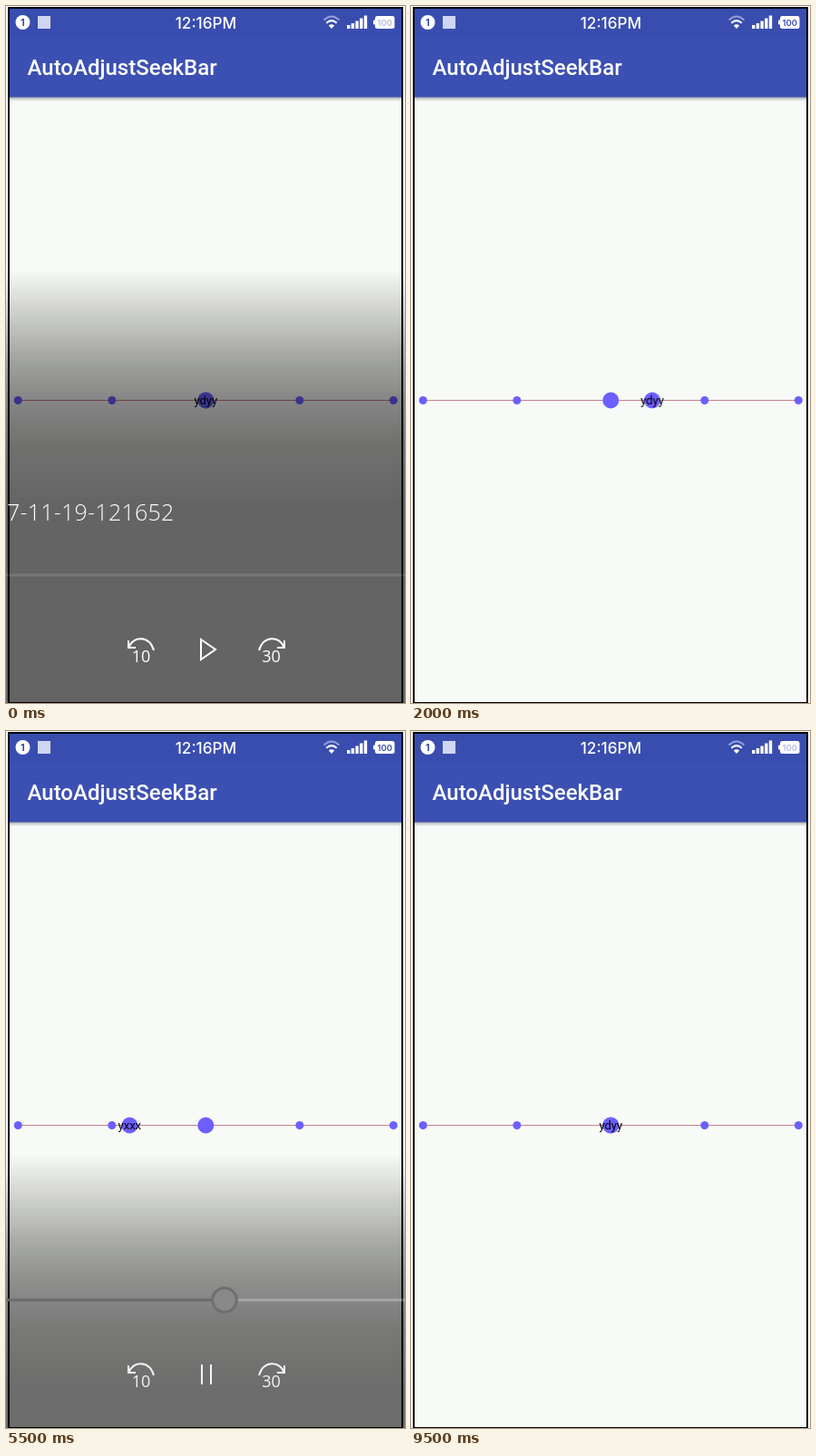
An HTML page for the animation above (9.6 s loop, 440x768 px).

```html
<!DOCTYPE html>
<html lang="en">
<head>
<meta charset="utf-8">
<title>AutoAdjustSeekBar</title>
<style>
html, body { margin: 0; width: 100%; height: 100%; overflow: hidden; background: #fff; }
svg { display: block; width: 440px; height: 768px; }
.clock { font: 500 17.2px Inter, sans-serif; }
.badge { font: 700 11px Inter, sans-serif; }
.title { font: 500 24px Roboto, sans-serif; }
.label { font: 13px Roboto, sans-serif; }
.file { font: 300 25px "Open Sans", sans-serif; letter-spacing: .25px; }
.skip { font: 18px "Open Sans", sans-serif; }
.charge { font: 600 9.5px Inter, sans-serif; }
.mid { text-anchor: middle; }
.line { fill: none; stroke: #fff; stroke-width: 2; }

/* One loop is 9.6 s, so 1% is 96 ms. */
.anim, .label { animation: 9.6s linear infinite; }
.label { animation-timing-function: step-end; }
#thumb { animation-name: drag; }
#mid { animation-name: mid; }
#right { animation-name: right; }
#left { animation-name: left; }
#end { animation-name: end; }
#shade { animation-name: shade; }
#file { animation-name: file; }
#icons { animation-name: icons; }
#seek { animation-name: seek; }
#head { animation-name: head; }
#play { animation-name: play; animation-timing-function: step-end; }
#pause { animation-name: pause; animation-timing-function: step-end; }
#charge { animation-name: charge; }

@keyframes drag {
  0%, 6.25% { transform: translateX(220px); }
  10.42%, 17.71% { transform: translateX(324px); }
  28.13% { transform: translateX(130px); }
  30.21%, 39.58% { transform: translateX(117px); }
  50%, 51.04% { transform: translateX(13px); }
  57.29% { transform: translateX(136px); }
  62.5% { transform: translateX(151px); }
  66.67% { transform: translateX(160px); }
  69.79% { transform: translateX(134px); }
  71.88%, 77.08% { transform: translateX(117px); }
  80.21% { transform: translateX(160px); }
  83.33%, 84.38% { transform: translateX(117px); }
  89.58%, 100% { transform: translateX(220px); }
}
@keyframes mid {
  0%, 20.5%, 86.98%, 100% { opacity: 1; }
  8.33%, 26.05% { opacity: 0; }
}
@keyframes right {
  0%, 20.5%, 100% { opacity: 0; }
  8.33% { opacity: 1; }
}
@keyframes left {
  0%, 44.79%, 86.98%, 100% { opacity: 0; }
  26.05%, 53.69% { opacity: 1; }
}
@keyframes end {
  0%, 53.69%, 100% { opacity: 0; }
  44.79% { opacity: 1; }
}
@keyframes shade {
  0%, 6.25% { opacity: 1; transform: none; }
  11.46% { opacity: .48; transform: translateY(145px); }
  14.58%, 22.92% { opacity: 0; transform: translateY(175px); }
  28.13% { opacity: .91; transform: translateY(175px); }
  31.25%, 58.33% { opacity: .94; transform: translateY(175px); }
  62.5% { opacity: .13; transform: translateY(175px); }
  66.67%, 100% { opacity: 0; transform: translateY(175px); }
}
@keyframes file {
  0%, 6.25% { opacity: 1; }
  11.46% { opacity: .28; }
  14.58%, 100% { opacity: 0; }
}
@keyframes icons {
  0%, 6.25% { opacity: 1; }
  11.46% { opacity: .5; }
  14.58%, 22.92% { opacity: 0; }
  28.13%, 58.33% { opacity: .92; }
  61.46%, 100% { opacity: 0; }
}
@keyframes seek {
  0%, 6.25% { opacity: .45; }
  11.46% { opacity: .6; }
  14.58%, 22.92% { opacity: 0; }
  28.13%, 58.33% { opacity: 1; }
  62.5% { opacity: .15; }
  66.67%, 100% { opacity: 0; }
}
@keyframes head {
  0%, 14.58% { transform: translateX(-60px); }
  22.92%, 28.13% { transform: translateX(13px); }
  57.29%, 100% { transform: translateX(241px); }
}
@keyframes play {
  0%, 100% { opacity: 1; }
  6.25% { opacity: 0; }
}
@keyframes pause {
  0%, 100% { opacity: 0; }
  6.25% { opacity: 1; }
}
@keyframes charge {
  0%, 6.25% { opacity: .38; }
  9.38%, 22.92% { opacity: 1; }
  28.13% { opacity: .65; }
  33.33%, 68.75% { opacity: 1; }
  76.04% { opacity: .55; }
  81.25%, 90.63% { opacity: 1; }
  93.75%, 100% { opacity: .38; }
}
</style>
</head>
<body>
<svg viewBox="0 0 440 768">
  <defs>
    <linearGradient id="dark" gradientUnits="userSpaceOnUse" x1="0" y1="290" x2="0" y2="550">
      <stop offset="0" stop-opacity="0"/>
      <stop offset=".23" stop-opacity=".21"/>
      <stop offset=".4" stop-opacity=".36"/>
      <stop offset=".55" stop-opacity=".46"/>
      <stop offset=".75" stop-opacity=".55"/>
      <stop offset="1" stop-opacity=".6"/>
    </linearGradient>
    <linearGradient id="drop" x1="0" y1="0" x2="0" y2="1">
      <stop offset="0" stop-opacity=".32"/>
      <stop offset="1" stop-opacity="0"/>
    </linearGradient>
    <g id="arc">
      <path class="line" d="M-13.5 -1.5C-9 -14 9 -15 14 2M-14 -9V-1H-6"/>
    </g>
  </defs>

  <!-- Phone screen -->
  <rect x="2" y="1" width="436" height="767"/>
  <rect x="4" y="3" width="432" height="764" fill="#f8faf7"/>
  <rect x="4" y="100" width="432" height="5" fill="url(#drop)"/>
  <rect x="4" y="3" width="432" height="97.5" fill="#3c50b3"/>
  <rect x="4" y="3" width="432" height="31" fill="#394daf"/>

  <!-- Status bar -->
  <g fill="#fff">
    <circle cx="18.5" cy="18" r="8"/>
    <text class="badge mid" x="18.3" y="22" fill="#394daf">1</text>
    <rect x="35" y="11" width="14" height="14" fill="#cfd6f2"/>
    <text class="clock mid" x="220.5" y="24.5">12:16PM</text>
    <g fill="none" stroke="#fff" stroke-width="2">
      <path d="M350.5 15.5Q359 7.5 367.5 15.5" opacity=".45"/>
      <path d="M353.3 18.8Q359 13.5 364.7 18.8"/>
    </g>
    <path d="M355.8 21.5Q359 18.8 362.2 21.5L359 25Z"/>
    <path d="M376 21h3.4v4h-3.4zM380.7 19h3.4v6h-3.4zM385.4 16.5h3.4v8.500h-3.4zM390.100 13.500h3.4v11.500h-3.4zM394.800 10.500h3.4v14.500h-3.4z"/>
    <rect x="405" y="15.5" width="3" height="5" rx="1"/>
    <rect x="407" y="11" width="21.500" height="14" rx="2.500"/>
    <text id="charge" class="charge mid anim" x="417.800" y="21.500" fill="#394daf">100</text>
    <text class="title" x="23.500" y="76">AutoAdjustSeekBar</text>
  </g>

  <!-- Slider -->
  <rect x="13" y="434" width="414" height="1" fill="#cb7f90"/>
  <g fill="#6c5fff">
    <circle cx="13.300" cy="434.500" r="4.500"/>
    <circle cx="116.800" cy="434.500" r="4.500"/>
    <circle cx="220.300" cy="434.500" r="9"/>
    <circle cx="323.800" cy="434.500" r="4.500"/>
    <circle cx="427.300" cy="434.500" r="4.500"/>
  </g>
  <g id="thumb" class="anim">
    <circle cx=".3" cy="434.500" r="9" fill="#6c5fff"/>
    <text id="mid" class="label mid" x=".3" y="438.500">ydyy</text>
    <text id="right" class="label mid" x=".3" y="438.500">xdxx</text>
    <text id="left" class="label mid" x=".3" y="438.500">yxxx</text>
    <text id="end" class="label mid" x=".3" y="438.500">xxxx</text>
  </g>

  <!-- Player controls -->
  <rect id="shade" class="anim" y="290" width="440" height="480" fill="url(#dark)"/>
  <text id="file" class="file anim" x="185.500" y="567" text-anchor="end" fill="#fff">2017-11-19-121652</text>
  <g id="seek" class="anim">
    <g id="head" class="anim">
      <rect x="-500" y="625.500" width="486" height="3" fill="#6b6d6b"/>
      <rect x="14" y="625.500" width="700" height="3" fill="#fff" opacity=".28"/>
      <circle cy="627" r="13.300" fill="#888a88" stroke="#6e706e" stroke-width="3"/>
    </g>
  </g>
  <g id="icons" class="anim" fill="#fff">
    <use href="#arc" x="149" y="708"/>
    <text class="skip mid" x="149" y="722.500">10</text>
    <use href="#arc" transform="translate(293 708) scale(-1 1)"/>
    <text class="skip mid" x="292.500" y="722.500">30</text>
    <path id="play" class="line anim" d="M215 698L231 709L215 720Z"/>
    <path id="pause" class="line anim" d="M216 698V720M226 698V720"/>
  </g>
</svg>
</body>
</html>
```
